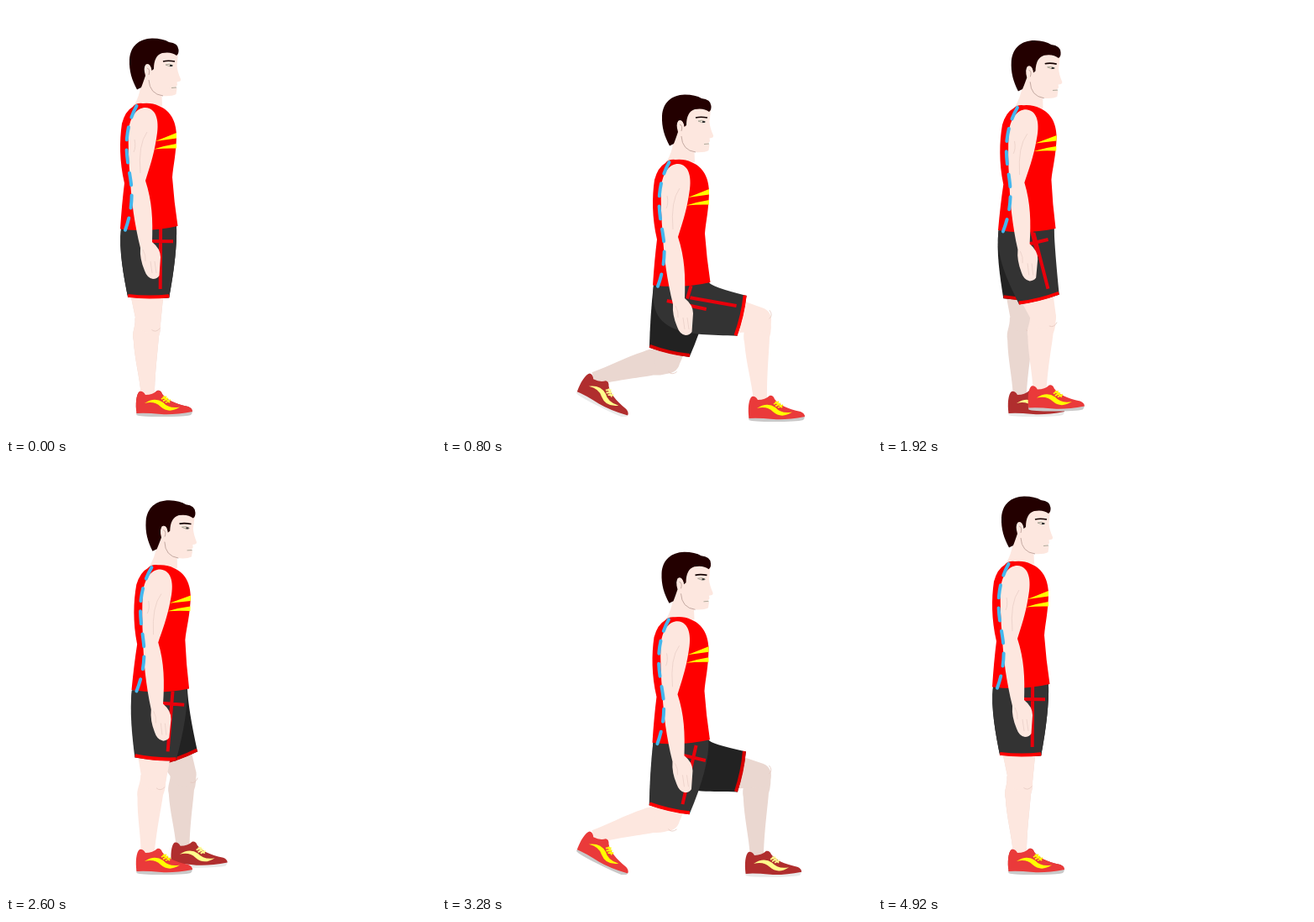
Write an HTML page with a canvas that moves like this. It is 512x512 px and loops after 4960 ms.

```html
<!DOCTYPE html>
<html>
<head>
<meta charset="utf-8">
<style>
html, body { margin: 0; width: 100%; height: 100%; overflow: hidden; background: #fff; }
canvas { display: block; }
</style>
</head>
<body>
<canvas id="stage" width="512" height="512"></canvas>
<script>
const ctx = document.getElementById('stage').getContext('2d');
const LOOP = 4960, TICK = 40, RETURN = 840;
const RED = '#ff0000', SKIN = '#fde7df';
const NEAR = { skin: SKIN, shorts: '#333', hem: RED, shoe: '#ea3a3a', stripe: '#ffff00', sole: '#c9c9c9', reach: 210, drop: 6 };
const FAR = { skin: '#ead7d0', shorts: '#222', hem: '#d80000', shoe: '#b02e2e', stripe: '#ffff8c', sole: '#e9e9e9', reach: 206, drop: 3 };

// Each lunge: start time, time to sink, and when the way back begins
const LUNGES = [
  { lead: NEAR, start: 0, sink: 800, back: 1160 },
  { lead: FAR, start: 2400, sink: 920, back: 1240 }
];

const lerp = (a, b, k) => a + (b - a) * k;
const clamp = k => Math.min(1, Math.max(0, k));
const ease = k => (1 - Math.cos(Math.PI * clamp(k))) / 2;
const rad = deg => deg * Math.PI / 180;

function fill(color, d) {
  ctx.fillStyle = color;
  ctx.fill(new Path2D(d));
}

function stroke(color, width, d, cap = 'butt') {
  ctx.strokeStyle = color;
  ctx.lineWidth = width;
  ctx.lineCap = cap;
  ctx.stroke(new Path2D(d));
}

function at(x, y, angle, draw) {
  ctx.save();
  ctx.translate(x, y);
  ctx.rotate(angle);
  draw();
  ctx.restore();
}

// Knee position for a thigh and shin of the given lengths, bending forward
function kneeOf(hx, hy, ax, ay, thigh, shin) {
  const d = Math.hypot(ax - hx, ay - hy);
  const ux = (ax - hx) / d, uy = (ay - hy) / d;
  const along = (thigh * thigh - shin * shin + d * d) / (2 * d);
  const out = Math.sqrt(Math.max(0, thigh * thigh - along * along));
  return [hx + ux * along + uy * out, hy + uy * along - ux * out];
}

// Shoe is drawn around the ankle at (169, 460)
function shoe(x, y, angle, c) {
  ctx.save();
  if (angle > 0) {
    ctx.beginPath();
    ctx.rect(0, 0, 512, 489);
    ctx.clip();
  }
  at(x, y, angle, () => {
    ctx.translate(-169, -460);
    fill(c.sole, 'M155 482L155.500 487Q160 489 185 489Q212 489 220 487Q222 485 222 481Z');
    fill(c.shoe, 'M155.500 485C154 474 155 462 159 459Q163 458 166 463Q175 463 180 458Q184 457 186 462Q193 472 217 477Q222 479 222 483Q200 487 185 486Q165 484 155.500 485Z');
    fill(c.stripe, 'M165 473Q177 465 187 472Q194 480 207 477.500Q194 486 184 477Q177 470 165 473Z');
    stroke(c.stripe, 1.8, 'M185 468L191 465M187 470.500L193 467M190 472L196 469M187 465L195 472');
  });
  ctx.restore();
}

function leg(hx, hy, { ax, ay, angle, thigh, shin }, c) {
  const [kx, ky] = kneeOf(hx, hy, ax, ay, thigh, shin);
  const ux = (kx - hx) / thigh, uy = (ky - hy) / thigh;
  const turn = Math.atan2(-ux, uy);
  const bend = clamp(-turn / rad(76));
  const hem = 62 + 12 * bend;
  const point = (x, y) => [hx + x * uy + y * ux, hy - x * ux + y * uy];

  at(kx, ky, Math.atan2(kx - ax, ay - ky), () => {
    ctx.scale(1, Math.hypot(ax - kx, ay - ky) / 86);
    fill(c.skin, 'M-16 -2C-15 10 -20 14 -17.500 25C-16 48 -10 68 -8 90L8 90C8 62 12 32 12.500 20Q16 10 14 -4Z');
  });
  at(hx, hy, turn, () => fill(c.skin, `M-22 ${hem - 6}L18 ${hem - 6}L15 ${thigh}A15 15 0 0 1 -15 ${thigh}Z`));
  at(kx, ky, turn, () => stroke('#e3c6bd', 0.7, 'M4 12Q9 16 14 10'));
  shoe(ax, ay, angle, c);

  // Shorts hang from a fixed waist to a hem that follows the thigh
  const pull = 1 + 1.5 * bend;
  const guide = point(-24.5 - 5 * pull, hem - 24 * pull);
  const wx = hx - 33, wy = hy - 20;
  fill(c.shorts, `M${wx} ${wy}C${wx - 3 - 4 * bend} ${wy + 25 + 34 * bend} ${guide} ${point(-24.5, hem)}
    Q${point(0, hem + 2)} ${point(24.5, hem)}Q${hx + 34} ${hy + 10 - 28 * bend} ${hx + 33} ${hy - 23}Z`);
  at(hx, hy, turn, () => {
    stroke(c.hem, 4, `M-24.500 ${hem - 2}Q0 ${hem + 1} 24.500 ${hem - 2}`);
    if (c !== NEAR) return;
    const m = (a, b) => lerp(a, b, bend);
    stroke('#e8000b', 4,
      `M${m(14, 7)} ${m(-20, 9)}L${m(14, 10)} ${m(52, 65)}
       M${m(14, -3)} ${m(-20, -17)}L${m(14, -2)} ${m(10, 31)}
       M${m(2, 5)} ${m(-5, 6)}L${m(29, 21)} ${m(-5, 7)}`);
  });
}

function head() {
  fill(SKIN, 'M161 92Q159 108 152 119Q168 124 186 119L185.500 107Q197 108 202.500 105L203.500 98L202 96.500L204 94L203.500 90.500Q209 90 208 87Q204 78 203.500 71L205 56L180 52L166 70Z');
  fill('#230000', 'M156 99.500C150 88 146.500 78 147 64C148 48 158 39 174 38.500Q187 38.500 194 43Q205 44 205.500 52Q206 57 203 59Q197 54 186 56Q176 59 176 75L173.500 77Q172 68 167 69.500Q163 73 166 83Q163 92 161 97Z');
  fill(SKIN, 'M166 70Q171 67 173 75Q174 83 169 86Q164 80 166 70Z');
  stroke('#b59a92', 0.8, 'M168 74Q172 75 170 82M170 88Q171 105 187 107');
  stroke('#120000', 1.7, 'M187 66Q193 64.500 201 66');
  stroke('#998', 0.8, 'M190 70Q195 68 199 71Q195 73 190 70M197 97.500L203 97');
  fill('#333', 'M195 70h3v2h-3Z');
}

function torso() {
  head();
  fill(RED, 'M151 120Q155 115 163 116Q174 115 182 119C197 125 202 138 203 152C203 175 199 190 198 204Q200 232 204.500 262Q170 270 136 265.500Q138 235 141 211C135 185 135 160 138 140Q142 125 151 120Z');
  fill('#ffff00', 'M178 161L203 151V157.500ZM176 170.500Q190 166 203 164V169.500Q190 169 176 170.500Z');
  fill(SKIN, 'M146 148C148 131 156 121 166 121C180 122 183 138 179 158C176 178 170 195 166 208C174 232 175 255 174 281Q184 289 184 299L182.500 321Q180 325 175 325Q168 324 165 315Q159 301 160 288C153 260 149 230 148 207Q145 175 146 148Z');
  stroke('#ead0c8', 0.8, 'M160 199Q157 165 168 150M153 159Q155 168 152 174M172 304L174 318M177 304L179 318M163 290Q167 297 166 304');
  ctx.setLineDash([15, 12.2]);
  stroke('#43b7ee', 4, 'M155.500 119Q146 136 144 157C142 178 147 195 149 212Q152 240 141.500 268', 'round');
  ctx.setLineDash([]);
}

function draw(t) {
  const { lead, start, sink, back } = LUNGES.findLast(l => t >= l.start);
  const time = t - start;
  const p = ease(time / sink) - ease((time - back) / RETURN) ** 2.6;
  const deep = p ** 4;
  const lift = Math.sin(Math.PI * Math.sqrt(p));
  const hx = 170 + 115 * p, hy = 285 + 40 * p + 27 * deep;

  const front = {
    ax: 169 + lead.reach * Math.min(1, p + Math.min(0.09, p)),
    ay: 460 + lead.drop * p - 10 * lift,
    angle: rad(-7 * Math.sin(Math.PI * p ** 3)),
    thigh: 88.5 + 6 * deep - 4.5 * lift,
    shin: 86.5 + 6 * deep - 4.5 * lift
  };
  // The rear foot rolls over the ball of the foot
  const roll = clamp((p - 0.13) * 1.5);
  const angle = rad(27 * roll);
  const s = Math.sin(angle), c = Math.cos(angle);
  const rear = {
    ax: 211 - 2 * roll - 42 * c + 28 * s,
    ay: 488 - roll - 42 * s - 28 * c,
    angle,
    thigh: 88.5 - 16 * clamp(2.5 * p),
    shin: 86.5
  };

  ctx.fillStyle = '#fff';
  ctx.fillRect(0, 0, 512, 512);
  leg(hx, hy, lead === FAR ? front : rear, FAR);
  leg(hx, hy, lead === NEAR ? front : rear, NEAR);
  at(hx, hy, rad(2 * lift), () => {
    ctx.translate(-170, -285);
    torso();
  });
}

const begin = performance.now();
function frame() {
  const t = (performance.now() - begin) % LOOP;
  draw(Math.floor(t / TICK) * TICK);
  requestAnimationFrame(frame);
}
frame();
</script>
</body>
</html>
```
